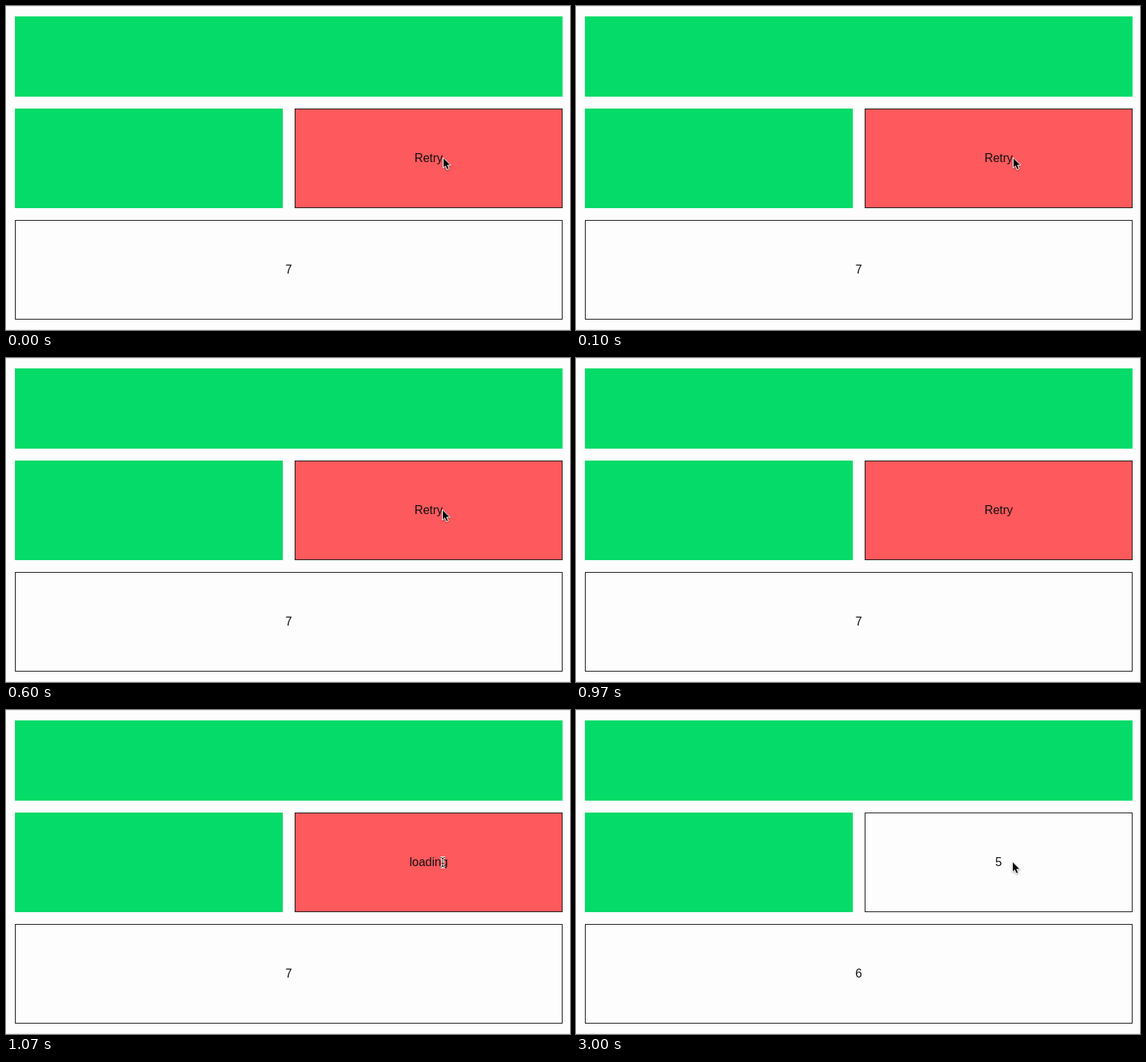
Write an HTML page that moves like this. It is 758 px wide and 436 px high and loops after 5.93 s.

```html
<!DOCTYPE html>
<html lang="en">
<head>
<meta charset="utf-8">
<title>Retry grid</title>
<style>
  html, body { margin: 0; width: 100%; height: 100%; overflow: hidden; background: #fdfdfd; }
  svg { display: block; }
  text { font: 16px "Liberation Sans", Arial, sans-serif; text-anchor: middle; fill: #111; }
  .done { fill: #05db68; }
  .cell { fill: #fdfdfd; stroke: #161616; }
  #arrow { filter: drop-shadow(0 1px 1px rgba(0, 0, 0, .35)); }
</style>
</head>
<body>
<svg width="758" height="436" viewBox="0 0 758 436">
  <rect width="758" height="436" fill="#fdfdfd"/>
  <path d="M0 .5H758M0 435.5H758" stroke="#e6e6e6"/>
  <rect class="done" x="12" y="14" width="736" height="108"/>
  <rect class="done" x="12" y="138" width="360" height="134"/>
  <rect class="cell" id="box" x="388.5" y="138.5" width="359" height="133"/>
  <rect class="cell" x="12.5" y="288.5" width="735" height="133"/>
  <text id="label" x="568" y="210"></text>
  <text id="count" x="380" y="360"></text>
  <g id="arrow">
    <path d="M0 0V14L3.1 11.2L5.3 16.2L8 15L5.9 10.2H10.2Z" fill="#000" stroke="#fff" stroke-width="1"/>
  </g>
  <g id="beam" fill="none">
    <path id="beamShape" d="M584 198.5Q587 198.5 587 200.5Q587 198.5 590 198.5M587 200V210M584 211.5Q587 211.5 587 209.5Q587 211.5 590 211.5M585.5 206.5H588.5" stroke="#fff" stroke-width="3"/>
    <use href="#beamShape"/>
    <path d="M584 198.5Q587 198.5 587 200.5Q587 198.5 590 198.5M587 200V210M584 211.5Q587 211.5 587 209.5Q587 211.5 590 211.5M585.5 206.5H588.5" stroke="#111"/>
  </g>
</svg>
<script>
  const LOOP = 5930;
  const HIDE = 970, LOADING = 1000, LOADED = 2570;
  const el = id => document.getElementById(id);
  const show = (id, on) => el(id).setAttribute("visibility", on ? "visible" : "hidden");
  const setText = (id, value) => {
    if (el(id).textContent !== value) el(id).textContent = value;
  };

  function render(t) {
    const loaded = t >= LOADED;
    setText("label", loaded ? "5" : t >= LOADING ? "loading" : "Retry");
    setText("count", loaded ? "6" : "7");
    el("box").style.fill = loaded ? "#fdfdfd" : "#fe595c";
    show("arrow", t < HIDE || loaded);
    show("beam", t >= LOADING && !loaded);
    el("arrow").setAttribute("transform", `translate(${t < 530 ? 587.5 : 586.5} 204)`);
  }

  const start = performance.now();
  function tick() {
    render((performance.now() - start) % LOOP);
    requestAnimationFrame(tick);
  }
  render(0);
  requestAnimationFrame(tick);
</script>
</body>
</html>
```
